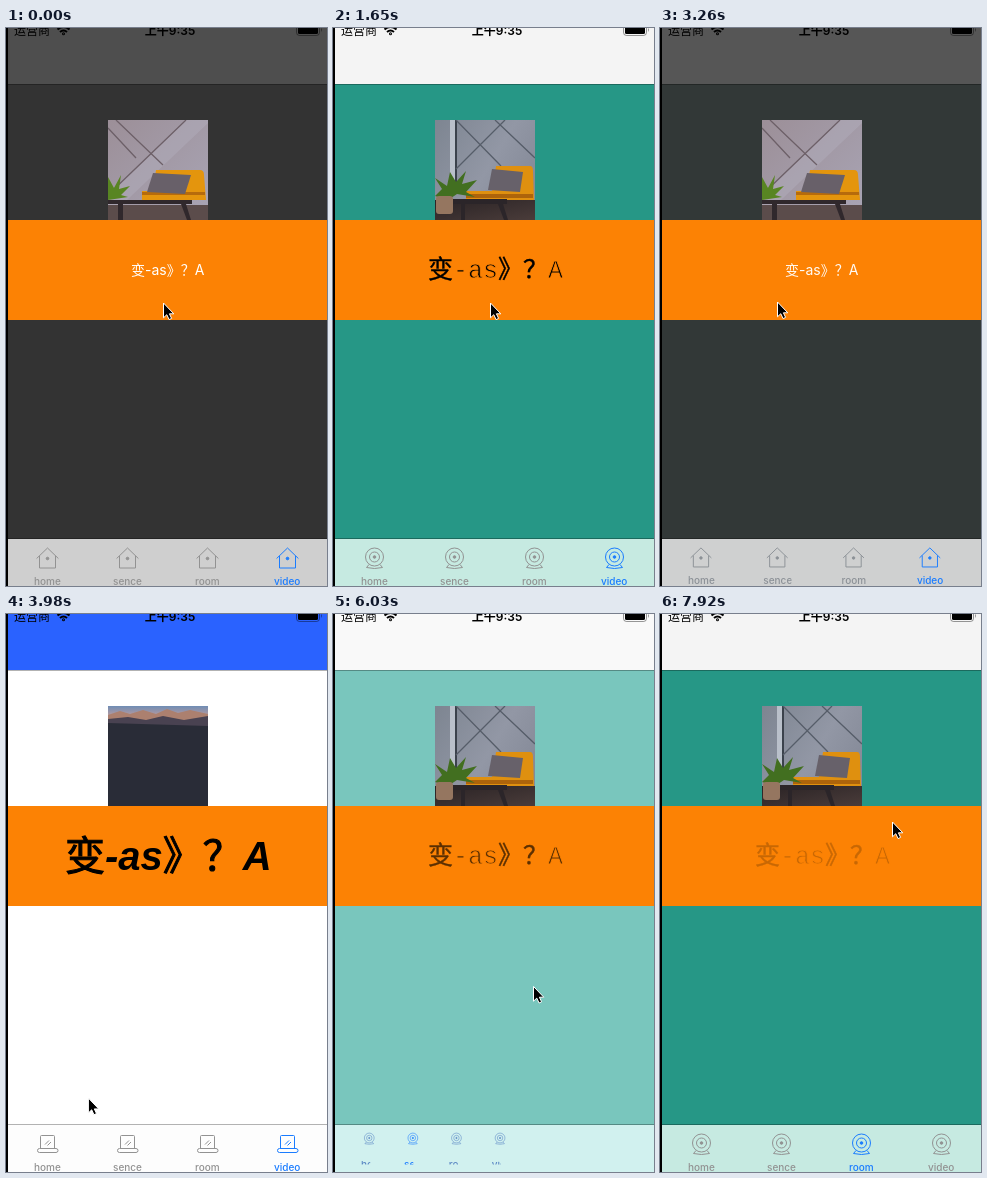
Write an HTML page that moves like this. It is 321 by 558 pixels and loops after 8000 ms.

```html
<!DOCTYPE html>
<html lang="zh-CN">
<head>
<meta charset="utf-8">
<title>Theme switcher</title>
<style>
  html, body { margin: 0; width: 100%; height: 100%; overflow: hidden; background: #000; }
  #stage { display: block; width: 100%; height: 100%; }
  text { font-family: Inter, "Noto Sans CJK SC", "Noto Sans CJK", sans-serif; white-space: pre; }
  .cjk { font-family: "Noto Sans CJK SC", "Noto Sans CJK", sans-serif; stroke: #000; }
  .status { font-size: 12px; }
  .tab text { font-size: 10px; font-weight: 500; }
  #title1 { font: italic bold 40px "Liberation Sans", "Noto Sans CJK SC", sans-serif; }
  #title1 .cjk { font-style: normal; font-weight: 400; stroke-width: 1; }
  /* The outline in the banner colour thins the Latin letters. */
  #title2 { font: 25px "Liberation Mono", "Noto Sans CJK SC", monospace; stroke: #fc8204; stroke-width: .8; }
  #title2 .cjk { stroke: #000; stroke-width: .4; }
</style>
</head>
<body>
<svg id="stage" viewBox="0 0 321 558">
  <defs>
    <linearGradient id="wall" x2="1" y2=".6">
      <stop stop-color="#7d8591"/><stop offset=".6" stop-color="#9297a5"/><stop offset="1" stop-color="#858a98"/>
    </linearGradient>
    <linearGradient id="warmWall" x2="1" y2="1">
      <stop stop-color="#9c8f98"/><stop offset="1" stop-color="#a9a5b5"/>
    </linearGradient>
    <linearGradient id="sky" x2="0" y2="1">
      <stop stop-color="#6f8db5"/><stop offset="1" stop-color="#b79a9f"/>
    </linearGradient>
    <linearGradient id="floor" x2="1" y2="1">
      <stop stop-color="#2a2325"/><stop offset="1" stop-color="#4a3c3a"/>
    </linearGradient>
    <g id="icon0">
      <path d="M.6 12.5 11.5 2 22.4 12.5M3.5 10V22H19.5V10"/>
      <circle cx="11.5" cy="12.5" r="1.3" fill="currentColor"/>
    </g>
    <g id="icon1">
      <path d="M4.5 16V4.5Q4.5 3.5 5.5 3.5H17.5Q18.5 3.5 18.5 4.5V16M9 12.5 13 8.5M11.5 13.5 15 10"/>
      <rect x="1.5" y="16.5" width="20.5" height="4" rx="2"/>
    </g>
    <g id="icon2">
      <circle cx="11.5" cy="11" r="9"/>
      <circle cx="11.5" cy="11" r="5"/>
      <circle cx="11.5" cy="11" r="1.3" fill="currentColor"/>
      <path d="M6 18.5 3.5 21.5Q11.5 23.5 19.5 21.5L17 18.5"/>
    </g>
    <clipPath id="frame"><rect width="100" height="100"/></clipPath>
  </defs>

  <rect id="page" x="2" width="319" height="558"/>
  <rect id="nav" x="2" width="319" height="56"/>
  <path d="M2 56.5H321" stroke="#000" stroke-opacity=".3"/>

  <g class="status">
    <text x="8" y="7">运营商</text>
    <g fill="none" stroke="#000" stroke-width="2">
      <path d="M51.5 1.5Q57.5-3.5 63.5 1.5M54 4Q57.5 1 61 4"/>
      <circle cx="57.5" cy="5.8" r=".5"/>
    </g>
    <text x="164" y="7" text-anchor="middle" font-weight="600">上午9:35</text>
    <rect x="290.5" y="-4.5" width="23" height="12" rx="3" fill="none" stroke="#000" stroke-opacity=".4"/>
    <rect x="292" y="-3" width="20" height="9" rx="1.5"/>
    <path d="M315 0Q317 1.5 315 4Z" fill-opacity=".4"/>
  </g>

  <g transform="translate(102 92)" clip-path="url(#frame)">
    <g id="photo0">
      <rect width="100" height="100" fill="url(#warmWall)"/>
      <path d="M0 75 78 0H100V3L0 98Z" fill="#b1adbb" fill-opacity=".5"/>
      <path d="M0 75 78 0M8 0 55 45M0 8 28 38" stroke="#6d6068" stroke-width="1.3"/>
      <path d="M0 85H100V100H0Z" fill="#5b4c4b"/>
      <path d="M48 50H92Q96 50 96 55L98 80H34V71H45Z" fill="#e4950d"/>
      <path d="M34 72H97V75H34Z" fill="#b66b0c"/>
      <path d="M45 53 83 55 77 74 39 72Z" fill="#686069"/>
      <path d="M0 80H84V84H78L83 100H79L73 84H15V100H10V84H0Z" fill="#30282c"/>
      <path d="M0 57 6 68 13 55 11 69 22 66 13 75 20 77 0 80Z" fill="#588522"/>
    </g>
    <g id="photo1">
      <rect width="100" height="100" fill="#292c37"/>
      <rect width="100" height="10" fill="url(#sky)"/>
      <path d="M0 9 12 5 22 8 35 4 48 8 59 3 70 7 82 4 100 8V18L0 15Z" fill="#ac806f"/>
      <path d="M0 13 20 11 38 14 55 10 76 14 100 10V20L0 17Z" fill="#494251"/>
    </g>
    <g id="photo2">
      <rect width="100" height="100" fill="url(#wall)"/>
      <rect x="15" width="5" height="66" fill="#b9c0ca"/>
      <path d="M21 0V66" stroke="#3b424c" stroke-width="2"/>
      <path d="M21 0 66 46M21 49 70 0M60 0 100 38" stroke="#565d69" stroke-width="1.3"/>
      <path d="M0 80H100V100H0Z" fill="url(#floor)"/>
      <path d="M61 46H95Q98 46 98 51L99 80H31V71H57Z" fill="#df900f"/>
      <path d="M31 74H98V78H31Z" fill="#ad640b"/>
      <path d="M57 49 88 52 85 72 53 70Z" fill="#67616a"/>
      <path d="M7 79H72V84H68L73 100H69L63 84H30V100H26V84H7Z" fill="#2b2529"/>
      <path d="M0 58 12 66 15 52 21 62 31 51 27 64 42 60 31 72 40 77 22 74 13 80 0 76 7 69Z" fill="#426f20"/>
      <rect x="1" y="76" width="17" height="18" rx="3" fill="#957660"/>
    </g>
  </g>

  <rect x="2" y="192" width="319" height="100" fill="#fc8204"/>
  <g id="titles">
    <text id="title0" x="125" y="247" font-size="14" fill="#fff">变-as》？A</text>
    <text id="title1" x="59" y="256"><tspan class="cjk">变</tspan>-as<tspan class="cjk">》？</tspan>A</text>
    <text id="title2" x="95" y="249.5"><tspan class="cjk">变</tspan>-as<tspan class="cjk">》？</tspan>A</text>
  </g>

  <rect id="bar" x="2" y="511" width="319" height="47"/>
  <path d="M2 510.5H321" stroke="#000" stroke-opacity=".3"/>
  <g id="tabs"></g>
  <path id="cursor" d="M.5 0V14.8L3.8 11.7 6.1 16.6 8.6 15.4 6.4 10.8H10.8Z" fill="#000" stroke="#fff"/>
</svg>

<script>
const LOOP = 8000, FADE = 300, GRAY = [146, 146, 146], BLUE = [26, 124, 255];
const $ = id => document.getElementById(id);

// "from" is the look a theme jumps to before it fades in; by default the previous theme.
const themes = [
  { page: [51, 51, 51], nav: [78, 78, 78], bar: [207, 207, 207] },
  { page: [255, 255, 255], nav: [42, 98, 255], bar: [253, 253, 253] },
  {
    page: [38, 151, 134], nav: [244, 244, 244], bar: [198, 234, 225],
    from: { page: [220, 255, 255], nav: [255, 255, 255], bar: [222, 249, 255] }
  }
];

// Each press dims the title until the switch to the next theme begins.
const switches = [
  { press: 120, start: 270 }, { press: 1110, start: 1275 }, { press: 2900, start: 3000 },
  { press: 3530, start: 3680 }, { press: 5800, start: 5872 }, { press: 7920, start: 9000 }
];

const selections = [[0, 3], [4520, 0], [5060, 1], [6840, 2]];

// time, x, y
const cursorPath = [
  [1740, 157, 275], [2190, 61, 513], [2370, 64, 508], [2810, 117, 274], [3640, 117, 274],
  [3980, 82, 484], [4340, 45, 527], [4520, 45, 527], [4880, 108, 530], [5150, 112, 528],
  [5700, 205, 266], [5880, 205, 268], [6030, 200, 372], [6350, 196, 505], [6660, 207, 532],
  [6840, 207, 532], [7200, 277, 535], [7290, 279, 535], [7740, 232, 208]
];

const tabs = [["home", 28], ["sence", 107], ["room", 189], ["video", 268]].map(([name, left]) => {
  $("tabs").insertAdjacentHTML("beforeend",
    `<g class="tab"><use fill="none" stroke="currentColor"/><svg y="547"><text fill="currentColor">${name}</text></svg></g>`);
  const root = $("tabs").lastElementChild;
  return { root, left, icon: root.querySelector("use"), box: root.querySelector("svg"), label: root.querySelector("text") };
});

const lerp = (a, b, p) => a + (b - a) * p;
const mix = (a, b, p) => a.map((v, i) => lerp(v, b[i], p));
const rgb = color => `rgb(${color.map(Math.round)})`;
const ease = p => p * p * (3 - 2 * p);

function cursorAt(t) {
  const next = cursorPath.findIndex(k => k[0] > t);
  if (next === 0) return cursorPath[0].slice(1);
  if (next < 0) return cursorPath.at(-1).slice(1);
  const [a, b] = [cursorPath[next - 1], cursorPath[next]];
  return mix(a, b, (t - a[0]) / (b[0] - a[0])).slice(1);
}

function drawTabs(theme, selected, p) {
  tabs.forEach((tab, i) => {
    const tint = i === selected ? BLUE : mix(BLUE, GRAY, p);
    tab.root.style.color = rgb(tint);
    tab.icon.setAttribute("href", `#icon${theme}`);
    tab.icon.setAttribute("transform", `translate(${30 + 80 * i * p} 518) scale(${p})`);
    tab.box.setAttribute("x", lerp(28, tab.left, p));
    tab.box.setAttribute("width", 31 * p * p);
    tab.box.setAttribute("height", 12 * p * p);
    tab.label.setAttribute("y", 9.5 - 5 * (1 - p));
  });
}

function draw(t) {
  const count = switches.filter(s => s.start <= t).length;
  const theme = count % 3;
  const p = count ? ease(Math.min(1, (t - switches[count - 1].start) / FADE)) : 1;
  const now = themes[theme], from = now.from || themes[(theme + 2) % 3];

  for (const part of ["page", "nav", "bar"]) {
    $(part).setAttribute("fill", rgb(mix(from[part], now[part], p)));
  }
  for (let i = 0; i < 3; i++) {
    const display = i === theme ? "" : "none";
    $(`photo${i}`).style.display = $(`title${i}`).style.display = display;
  }

  const pressed = switches.some(s => t >= s.press && t < s.start);
  $("titles").setAttribute("opacity", pressed ? 0.2 : lerp(0.2, 1, p));
  drawTabs(theme, selections.findLast(s => s[0] <= t)[1], p);
  $("cursor").setAttribute("transform", `translate(${cursorAt(t)})`);
}

const begin = performance.now();
function tick() {
  draw((performance.now() - begin) % LOOP);
  requestAnimationFrame(tick);
}
tick();
</script>
</body>
</html>
```
